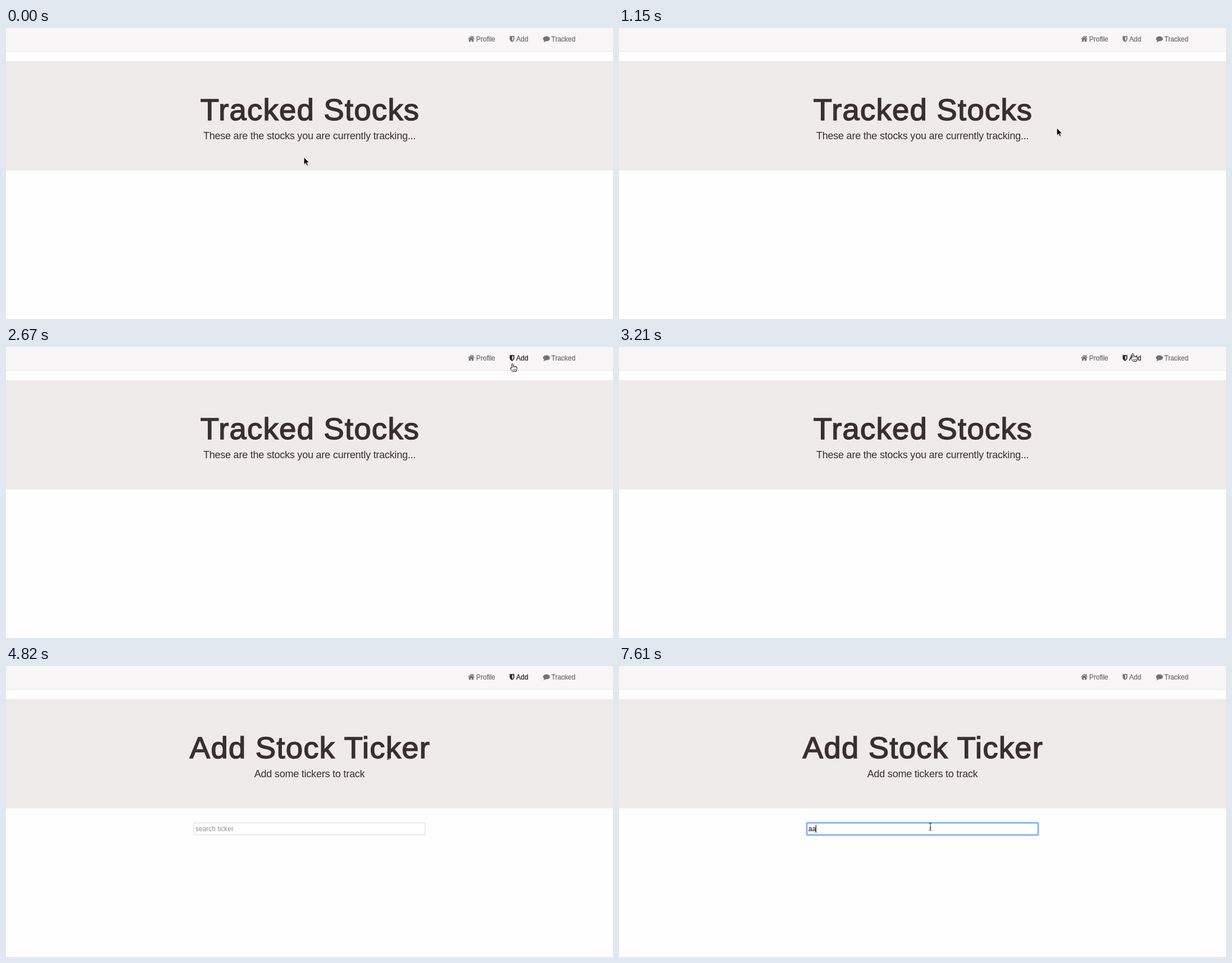
An HTML page that plays this animation: 1080x518 px, repeating every 7.99 s.

```html
<!DOCTYPE html>
<html lang="en">
<head>
<meta charset="utf-8">
<title>Tracked Stocks</title>
<style>
  html, body { margin: 0; width: 100%; height: 100%; overflow: hidden; background: #fefefe; }
  svg { display: block; width: 100%; height: 100%; font: 12px "Liberation Sans", Arial, sans-serif; }
  .nav { fill: #777070; stroke: #777070; stroke-width: .3; }
  .nav.hover { fill: #2b2428; stroke: #2b2428; }
  .title { font-size: 54.5px; letter-spacing: 1.2px; fill: #382f33; stroke: #382f33; stroke-width: 1.5; text-anchor: middle; }
  .lead { font-size: 18px; letter-spacing: -.22px; fill: #382f33; text-anchor: middle; }
</style>
</head>
<body>
<svg viewBox="0 0 1080 518">
  <rect width="1080" height="518" fill="#fefefe"/>
  <rect width="1080" height="41" fill="#f8f6f7"/>
  <rect y="41" width="1080" height="1" fill="#e7e5e5"/>
  <rect y="59" width="1080" height="194.5" fill="#efebea"/>

  <g class="nav">
    <path d="M827.8 14L822 19.2l.7.8 5.1-4.5 5.1 4.5.7-.8-1.8-1.6v-3h-1.6v1.6zM827.8 16.4l-4 3.5v4.4h3v-3h2v3h3v-4.4z"/>
    <text x="836.5" y="24">Profile</text>
  </g>
  <g class="nav" id="add">
    <path fill-rule="evenodd" d="M896.3 14.5h8v5.3q0 3-4 5.2-4-2.2-4-5.2zM900.4 15.9v7.4q2.5-1.5 2.5-3.6v-3.8z"/>
    <text x="907.8" y="24">Add</text>
  </g>
  <g class="nav">
    <path d="M961.6 15c3.4 0 6 1.9 6 4.2s-2.6 4.2-6 4.2l-1.2-.1q-1.7 1.6-4 1.8 1.2-1.1 1.2-2.7-2-1.2-2-3.2c0-2.3 2.6-4.2 6-4.2z"/>
    <text x="970.3" y="24">Tracked</text>
  </g>

  <text class="title" id="title" x="540.9" y="164.4"></text>
  <text class="lead" id="lead" x="540" y="198"></text>

  <g id="search">
    <rect x="334.5" y="279.5" width="411" height="21" fill="#fff" stroke="#dddbdb"/>
    <g id="focus" fill="none" stroke="#6eadf5">
      <rect x="333.5" y="278.5" width="413" height="23" rx="2" stroke-width="3" opacity=".4"/>
      <rect x="334.5" y="279.5" width="411" height="21" rx="1" stroke-width="2"/>
    </g>
    <text id="query" x="337" y="294"></text>
    <rect id="caret" y="283" width="1" height="14"/>
  </g>

  <g id="cursor">
    <g id="arrow">
      <path d="M1 2V15.5L4 12.7 6.3 17 8.6 16 6.7 11.7H10.7Z" opacity=".15"/>
      <path d="M0 0V13.2L3 10.4 5.1 15 7.4 14 5.4 9.7H9.5Z" stroke="#fff" stroke-width=".9"/>
    </g>
    <g id="hand" fill="#fff" stroke="#111" stroke-linejoin="round">
      <path d="M-1.2 8.5V1.3Q0-.4 1.2 1.3V5.2Q2.5 4.2 3.6 5.4 5 4.8 6 6 8 5.8 8 7.5V10.5L6.8 14.5H.5L-3.6 9Q-3.8 7-1.2 8.5Z"/>
      <path d="M1.2 5V8M3.6 5.4V8M6 6V8M1.5 10V13M3.5 10V13M5.5 10V13" stroke-width=".7"/>
    </g>
    <path id="beam" d="M-2.5-6.5Q0-6.5 0-5 0-6.5 2.5-6.5M0-5V5M-2.5 6.5Q0 6.5 0 5 0 6.5 2.5 6.5M-1.5 2H1.5" fill="none" stroke="#222"/>
  </g>
</svg>
<script>
const LOOP = 7990, PAGE = 4080, FOCUS = 5610;
const $ = id => document.getElementById(id);
const show = (id, on) => { $(id).style.display = on ? '' : 'none'; };

// The pointer is sampled: each move takes `steps` jumps between start and end
// along a quadratic curve; `ease` is the ease-out power.
const moves = [
  { start: 90, end: 90, steps: 1, to: [530, 284] },
  { start: 260, end: 260, steps: 1, to: [546, 325] },
  { start: 530, end: 1240, steps: 9, via: [725, 272], to: [781, 174], ease: 1.8 },
  { start: 1330, end: 1590, steps: 4, to: [855, 118] },
  { start: 2070, end: 2850, steps: 10, to: [913, 7] },
  { start: 2940, end: 2940, steps: 1, to: [914, 7] },
  { start: 3120, end: 3210, steps: 2, to: [914, 11] },
  { start: 4580, end: 4580, steps: 1, to: [850, 55] },
  { start: 4730, end: 5260, steps: 7, via: [652, 154], to: [554, 286], ease: 2 }
];

function pointer(t) {
  let pos = [530, 230];
  for (const { start, end, steps, via, to, ease = 1 } of moves) {
    if (t < start) break;
    const gap = (end - start) / (steps - 1) || 1;
    // Jumps fall on a 10 ms grid, so allow a little early.
    const done = Math.min(steps, Math.floor((t - start) / gap + 1.08));
    const u = 1 - (1 - done / steps) ** ease;
    pos = pos.map((from, i) => {
      const mid = via ? via[i] : (from + to[i]) / 2;
      return (1 - u) ** 2 * from + 2 * u * (1 - u) * mid + u * u * to[i];
    });
  }
  return pos.map(Math.round);
}

function draw(t) {
  const adding = t >= PAGE, focused = t >= FOCUS;
  $('title').textContent = adding ? 'Add Stock Ticker' : 'Tracked Stocks';
  $('lead').textContent = adding ? 'Add some tickers to track'
    : 'These are the stocks you are currently tracking...';

  const typed = t >= 6620 ? 'aa' : t >= 6360 ? 'a' : '';
  const blink = (t >= 6150 && t < 6360) || (t >= 7160 && t < 7610);
  show('search', adding);
  show('focus', focused);
  show('caret', focused && !blink);
  $('query').textContent = typed || 'search ticker';
  $('query').setAttribute('fill', typed ? '#000' : '#988f8f');
  $('caret').setAttribute('x', [337, 344, 350][typed.length]);

  const [x, y] = pointer(t);
  const overText = adding && ((y > 120 && y < 205) || y > 278);
  const kind = y < 35 ? 'hand' : overText ? 'beam' : 'arrow';
  for (const id of ['arrow', 'hand', 'beam']) show(id, id === kind);
  $('cursor').setAttribute('transform', `translate(${x} ${y})`);
  $('add').classList.toggle('hover', !focused && (y < 35 || t > 3210));
}

function frame() {
  draw(performance.now() % LOOP);
  requestAnimationFrame(frame);
}
frame();
</script>
</body>
</html>
```
